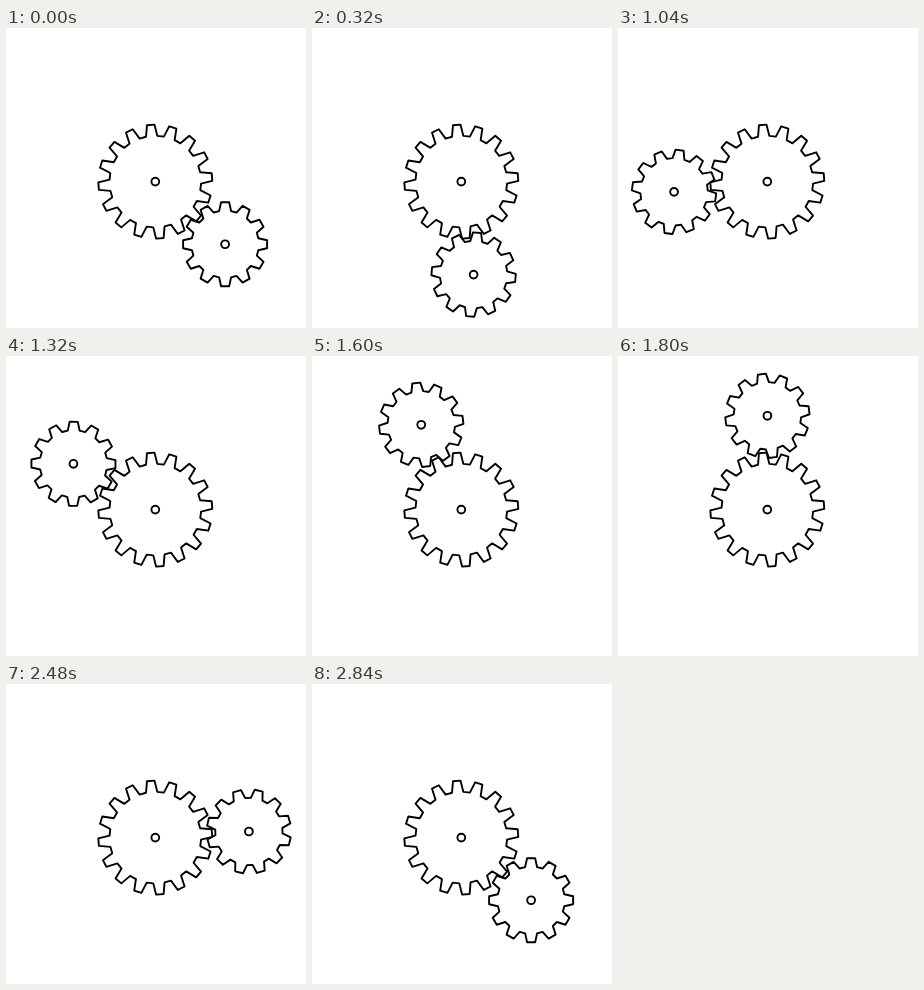
An HTML page with a canvas that plays this animation: 300 px wide and 300 px high, repeating every 2880 ms.

```html
<!DOCTYPE html>
<html lang="en">
<head>
<meta charset="utf-8">
<title>Planetary gears</title>
<style>
  html, body { margin: 0; width: 100%; height: 100%; overflow: hidden; background: #fff; }
  canvas { display: block; width: 300px; height: 300px; }
</style>
</head>
<body>
<canvas id="stage" width="300" height="300"></canvas>
<script>
const ctx = document.getElementById('stage').getContext('2d');
const RAD = Math.PI / 180;
const STEP = 40, STEPS = 72;
const ORBIT = 93.8, START = 41.9;

// tipHalf and rootHalf are half the tooth's angle at its tip and foot
const sun = { teeth: 16, tip: 57, root: 45.8, tipHalf: 3.8, rootHalf: 7.1, phase: -94.6 };
const planet = { teeth: 12, tip: 42.2, root: 33.7, tipHalf: 5.5, rootHalf: 10.2, phase: -90 };
const center = { x: 149.3, y: 153.6 };

function drawGear(gear, x, y, turn) {
  const pitch = 360 / gear.teeth;
  const point = (r, deg) => ctx.lineTo(x + r * Math.cos(deg * RAD), y + r * Math.sin(deg * RAD));
  ctx.beginPath();
  for (let i = 0; i < gear.teeth; i++) {
    const mid = gear.phase + turn + i * pitch;
    point(gear.root, mid - gear.rootHalf);
    point(gear.tip, mid - gear.tipHalf);
    point(gear.tip, mid + gear.tipHalf);
    point(gear.root, mid + gear.rootHalf);
  }
  ctx.closePath();
  ctx.moveTo(x + 3.9, y);
  ctx.arc(x, y, 3.9, 0, 2 * Math.PI);
  ctx.stroke();
}

function draw(now) {
  const step = Math.floor(now / STEP) % STEPS;
  // the last step completes the orbit
  const travel = 360 * step / (STEPS - 1);
  const angle = (START + travel) * RAD;
  ctx.fillStyle = '#fff';
  ctx.fillRect(0, 0, 300, 300);
  ctx.strokeStyle = '#000';
  ctx.lineWidth = 1.9;
  ctx.lineJoin = 'round';
  drawGear(sun, center.x, center.y, 0);
  drawGear(planet,
    center.x + ORBIT * Math.cos(angle),
    center.y + ORBIT * Math.sin(angle),
    travel * (1 + sun.teeth / planet.teeth));
}

const begin = performance.now();
function tick() {
  draw(performance.now() - begin);
  requestAnimationFrame(tick);
}
tick();
</script>
</body>
</html>
```
